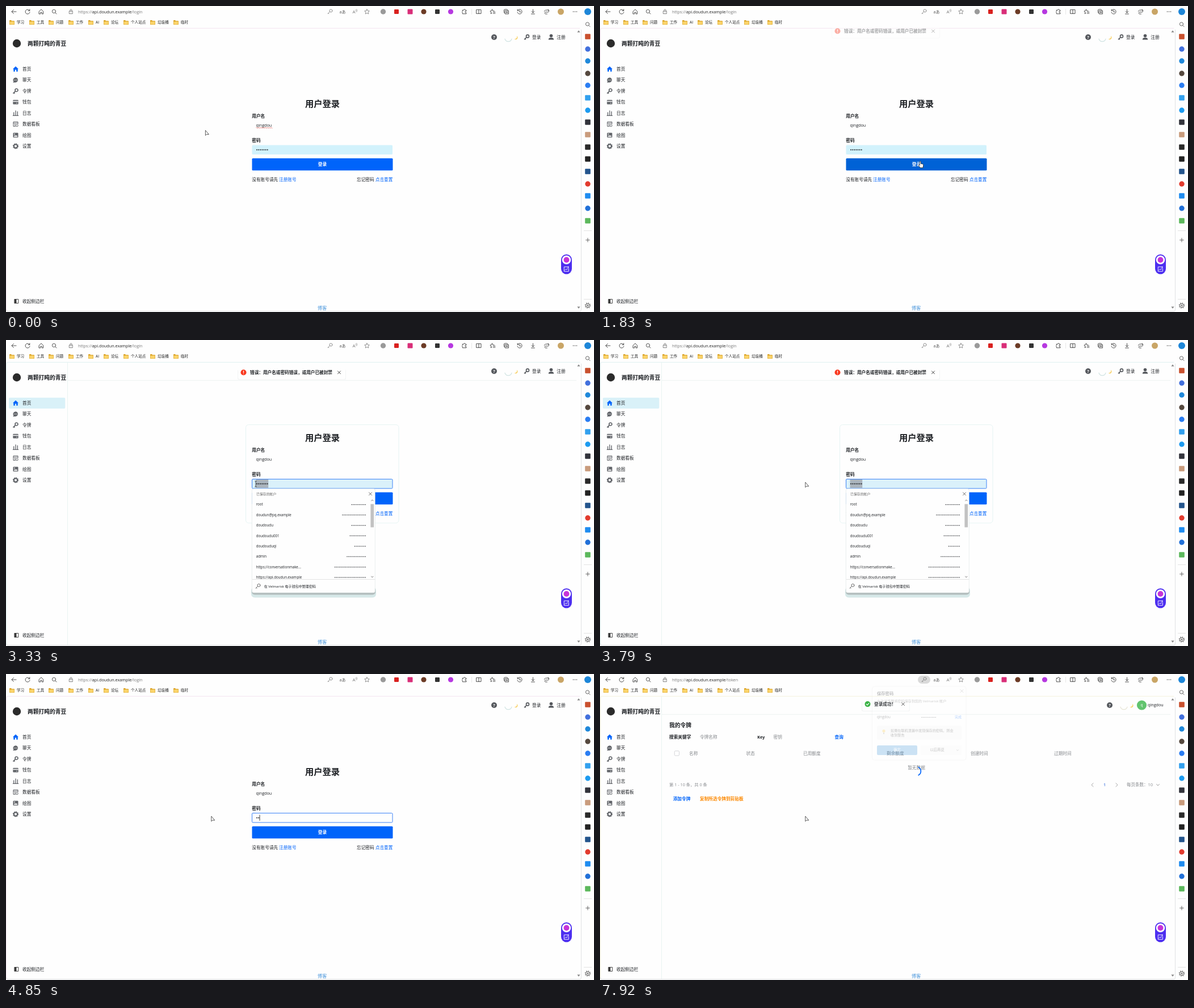
An HTML page for the animation above (8 s loop, 1036 by 540 pixels).

```html
<!DOCTYPE html>
<html lang="zh-CN">
<head>
<meta charset="utf-8">
<title>用户登录</title>
<style>
html, body { margin: 0; width: 100%; height: 100%; overflow: hidden; background: #fefefe; }
svg { display: block; width: 1036px; height: 540px; }
text { font-family: 'Open Sans', 'Noto Sans CJK SC', 'Noto Sans CJK', sans-serif; white-space: pre; }
</style>
</head>
<body>
<svg id="stage" viewBox="0 0 1036 540" xmlns="http://www.w3.org/2000/svg"></svg>
<script>
const LOOP = 8000;
const INK = '#1c1f23', GREY = '#85888c', BLUE = '#0064fa', ICON = '#62656a', BAR = '#3c3c3c';

// Drawing helpers; text is placed by its middle height.
const text = (x, y, s, size = 7.67, fill = INK, weight = 400, anchor = 'start') =>
  `<text x="${x}" y="${(y + size * .37).toFixed(2)}" font-size="${size}" fill="${fill}" font-weight="${weight}" text-anchor="${anchor}">${s}</text>`;
const rect = (x, y, w, h, fill, r = 0, more = '') =>
  `<rect x="${x}" y="${y}" width="${w}" height="${h}" rx="${r}" fill="${fill}" ${more}/>`;
const disc = (x, y, r, fill, more = '') => `<circle cx="${x}" cy="${y}" r="${r}" fill="${fill}" ${more}/>`;
const box = (x, y, size, fill) => rect(x - size / 2, y - size / 2, size, size, fill, 1.2);
const line = (d, x, y, color = BAR, width = .9) =>
  `<path d="${d}" transform="translate(${x} ${y})" fill="none" stroke="${color}" stroke-width="${width}" stroke-linecap="round" stroke-linejoin="round"/>`;
const solid = (d, x, y, fill = ICON) => `<path d="${d}" transform="translate(${x} ${y})" fill="${fill}"/>`;
const dots = (x, y, n, pitch, size, id = '') =>
  `<path ${id && `id="${id}"`} d="M${x} ${y}h${(n - 1) * pitch + .1}" fill="none" stroke="${INK}" stroke-width="${size}" stroke-linecap="round" stroke-dasharray="0 ${pitch}"/>`;
const group = (id, body, more = '') => `<g id="${id}" ${more}>${body}</g>`;

const CROSS = 'M-2.5-2.5L2.5 2.5M2.5-2.5L-2.5 2.5';
const LENS = 'M1.9 1.9L4 4M2.6-.6A3.1 3.1 0 1 1-3.6-.6A3.1 3.1 0 1 1 2.6-.6';
const KEY = 'M4-1.6A2.5 2.5 0 1 1-1-1.6A2.5 2.5 0 1 1 4-1.6M-.4 0L-4 3.7M-3 2.7L-2 3.7';
const STAR = 'M0-4.3L1.3-1.5L4.3-1.2L2.1.9L2.7 4L0 2.5L-2.7 4L-2.1.9L-4.3-1.2L-1.3-1.5Z';
const gear = (x, y, c, w) => disc(x, y, 3.2, 'none', `stroke="${c}" stroke-width="${w}"`) +
  disc(x, y, 4.5, 'none', `stroke="${c}" stroke-width="1.2" stroke-dasharray="1.7 1.83"`);
const help = x => disc(x, 55, 5, '#55585d') + text(x, 55, '?', 7.5, '#fff', 700, 'middle');
const toggle = (x, shade) => line('M-6 2A6.2 6.2 0 0 0 6 2', x, 56, shade, 1.1) +
  solid('M1.7-3.3A3.6 3.6 0 1 1-3 2.1A4 4 0 0 0 1.7-3.3', x + 13.3, 56, '#f8d168');

function toolbar() {
  let s = line('M4 0H-4M-.6-3.4L-4 0L-.6 3.4', 14, 10) +
    line('M3.6-1.8A4 4 0 1 0 4 1M3.8-4.2V-1.6H1.2', 38, 10) +
    line('M-3.6-.6L0-4L3.6-.6V4H1.2V1.2H-1.2V4H-3.6Z', 62, 10) + line(LENS, 85, 10) +
    line('M-2.8-1H2.8V3.6H-2.8ZM-1.5-1V-2.6A1.5 1.5 0 0 1 1.5-2.6V-1M0 1V1.3', 114.5, 10, '#666', .8) +
    `<text x="127" y="12.8" font-size="7.25" fill="#777">https://<tspan fill="#222">api.doudun.example</tspan><tspan id="route">/login</tspan></text>` +
    rect(560, 3, 22, 14, '#dadada', 7, 'id="pill"') + line(KEY, 571, 10, '#777', .8) +
    text(593, 10, 'aあ', 7, '#555', 400, 'middle') + text(613, 10, 'A', 8, '#777', 400, 'middle') +
    line('M-1-1.5Q.3 0-1 1.5M.6-2.4Q2.4 0 .6 2.4', 617.3, 8, '#777', .6) + line(STAR, 636, 10, '#777', .8) +
    disc(664.5, 10, 4.7, '#9a9a9a') + box(688, 10, 8, '#d9211f') + box(712, 10, 9, '#d92e78') +
    disc(736, 10, 4.6, '#6c3b26') + box(760, 10, 8, '#333') + disc(783.5, 10, 4.6, '#b638e0') +
    line('M-3.2-2.7H-1A1.4 1.4 0 1 1 1.8-2.7H3.4V-.8A1.4 1.4 0 1 0 3.4 1.8V3.8H-3.2V1.8A1.6 1.6 0 0 1-3.2-.9Z', 807.5, 10) +
    rect(820, 5, .7, 10, '#ddd') +
    line('M-4-3.4H4V3.4H-4ZM0-3.4V3.4', 833, 10) +
    line('M-1-4L.2-1.4L2.8-1.2M-1-4L-2.2-1.4L-4.6-1L-2.8.9L-3.3 3.6L-1.2 2.4M1 .8H4.4M.8 3H4.4', 857.5, 10) +
    line('M-4-2.6Q-4-4-2.6-4H1Q2.4-4 2.4-2.6M-4-2.6V1Q-4 2.4-2.6 2.4M-1.8-1.8H4V4H-1.8ZM1.1-.4V2.6M-.4 1.1H2.6', 881.5, 10) +
    line('M-3.6-2A4.1 4.1 0 1 1-4 1M-3.8-4V-1.8H-1.6M0-2.2V.5H2', 905, 10) +
    line('M0-4V2M-2.4-.4L0 2L2.4-.4M-3 4H3', 928.5, 10) +
    line('M-1.5-2.8H2.2A1.8 1.8 0 0 1 2.2.8H-2.2A1.8 1.8 0 0 0-2.2 4H1M4.3-2.2L2.4-4M-4-.5L-2.5-2.5', 952.5, 10) +
    disc(977.5, 10, 5.5, '#c9a566') +
    [-3, 0, 3].map(d => disc(1002.5 + d, 10, .75, '#333')).join('') + disc(1025, 10, 6, '#1d86d8');
  [['学习', 6], ['工具', 41], ['问题', 75], ['工作', 110], ['AI', 145], ['论坛', 172], ['个人站点', 207], ['垃圾桶', 254], ['临时', 295]]
    .forEach(([name, x]) => {
      s += solid('M0-3.2Q0-4 .8-4H3L4.2-2.8H8.2Q9-2.8 9-2V3.2Q9 4 8.2 4H.8Q0 4 0 3.2Z', x, 29, '#dba52b') +
        rect(x + .6, 27.6, 7.8, 4.8, '#fbd56d', .6) + text(x + 13, 29, name, 6.6, '#222');
    });
  return s;
}

function rail() {
  const apps = [[54, '#c9502e', 1], [76, '#4270dd', 0], [97, '#1f88da', 0], [119, '#55483e', 0], [140, '#2a7df2', 0],
    [162, '#32a0ee', 1], [184, '#1d9bf0', 0], [205, '#33343c', 1], [227, '#c99b7c', 1], [249, '#2a2a2a', 1],
    [270, '#222', 1], [292, '#23548c', 1], [314, '#e23b2e', 0], [335, '#1f8cf0', 1], [357, '#2170d8', 0], [379, '#5cb85c', 1]];
  return line(LENS, 1025, 32.5, '#555') +
    apps.map(([y, c, sq]) => sq ? box(1025, y, 9.6, c) : disc(1025, y, 4.7, c)).join('') +
    rect(1018, 396, 14, .8, '#ddd') + line('M-3.3 0H3.3M0-3.3V3.3', 1025, 413, '#555') +
    rect(1018, 517, 14, .8, '#ddd') + gear(1025, 528.5, '#555', .9) + disc(1025, 528.5, 1.2, '#555');
}

function sidebar() {
  const names = ['首页', '聊天', '令牌', '钱包', '日志', '数据看板', '绘图', '设置'];
  const at = i => 111.2 + i * 19.45;
  const icons = [
    y => solid('M0-4.8L5 0H3.7V4.5H1.2V1.3H-1.2V4.5H-3.7V0H-5Z', 17, y, BLUE),
    y => solid('M0-4.5A4.8 4.4 0 1 1-1.5 4.2L-4.4 4.8L-3.7 2.6A4.7 4.5 0 0 1 0-4.5', 17, y) +
      [-2.2, 0, 2.2].map(d => disc(17 + d, y, .7, '#fff')).join(''),
    y => line(KEY, 17, y, ICON, 1.7),
    y => rect(12.3, y - 3.8, 9.4, 7.8, ICON, 1) + rect(12.3, y - 1.9, 9.4, 1.5, '#fff') + rect(18, y + 1.3, 2, .8, '#fff'),
    y => line('M-3.3 3.4V-1M0 3.4V-4M3.3 3.4V-2.5M-4.6 4.4H4.6', 17, y, ICON, 1.3),
    y => line('M4-.4V-4H-4V4H-.5M-4-1.8H4M-2 .4H0M-2 2.2H-1', 17, y, ICON, 1) + disc(19.3, y + 2.4, 1.9, 'none', `stroke="${ICON}"`),
    y => rect(12.5, y - 4.2, 9, 8.4, ICON, 1.2) + solid('M-3.4 2.9L-1.2-.2L.4 1.4L1.8.2L3.5 2.9Z', 17, y, '#fff') + disc(15, y - 2, .9, '#fff'),
    y => gear(17, y, ICON, 2.2)
  ];
  return disc(19, 66, 7.2, '#2b2b2b') + text(38, 66.3, '两颗打盹的青豆', 9.75, INK, 700) +
    names.map((n, i) => icons[i](at(i)) + text(29, at(i), n)).join('') +
    line('M-3.3-3.5H3.3V3.5H-3.3Z', 18.5, 521, '#333', .9) + rect(15.2, 517.5, 3.2, 7, '#333') + text(29, 521, '收起侧边栏');
}

function login() {
  return group('card', rect(422.5, 149.5, 269.5, 173.5, 'none', 5, 'stroke="#e4f3f2" stroke-width=".9"')) +
    text(557.5, 172, '用户登录', 15.3, INK, 700, 'middle') +
    text(433.3, 194, '用户名', 7.67, INK, 700) + text(440.5, 210.4, 'qingdou', 7.2) +
    `<path id="spell" d="M440.5 215${'q.8-1.6 1.6 0t1.6 0'.repeat(9)}" fill="none" stroke="#e0453c" stroke-width=".7"/>` +
    text(433.3, 237, '密码', 7.67, INK, 700) +
    rect(433.5, 245.5, 247.5, 16.5, '#d2f2fc', 1.5, 'id="field" stroke-width="1"') +
    rect(440.5, 246, 21.7, 15, '#aab4bd', 0, 'id="picked"') +
    dots(442.1, 253.7, 7, 3.1, 2, 'secret') + rect(0, 248.4, .8, 10.4, '#111', 0, 'id="caret"') +
    rect(433.5, 268.7, 248, 21.6, BLUE, 1.6, 'id="submit"') + text(557.5, 279.5, '登录', 7.67, '#fff', 700, 'middle') +
    text(433.3, 306.5, '没有账号请先') + text(481, 306.5, '注册账号', 7.67, BLUE) +
    text(618, 306.5, '忘记密码') + text(650.8, 306.5, '点击重置', 7.67, BLUE) +
    help(860) + toggle(885, '#cfe3e2') + line(KEY, 917.5, 55, '#55585d', 1.6) + text(927, 55, '登录') +
    disc(960.5, 52.5, 2.8, '#55585d') + solid('M-4.7 4.5Q-4.7.8 0 .8Q4.7.8 4.7 4.5Z', 960.5, 55, '#55585d') + text(970.3, 55, '注册');
}

function accounts() {
  const rows = [['root', 10], ['doudun@pq.example', 16], ['doudoudu', 10], ['doudoudu001', 11], ['doudouduqi', 8],
    ['admin', 13], ['https://conversationmake...', 21], ['https://api.doudun.example', 21]];
  return rect(432, 436, 220, 18.5, '#d6e8e8', 6) + rect(433, 436, 218, 13.5, '#b3bdbd', 5) +
    rect(433.3, 262.5, 217, 183.5, '#fefefe', 3, 'stroke="#d5dcdc" stroke-width=".5"') +
    text(441, 271.5, '已保存的帐户', 5.9, '#666') + line(CROSS, 642, 271.5, '#444', .8) +
    `<g clip-path="url(#list)">` + rows.map(([name, n], i) => {
      const y = 290.2 + i * 18.36;
      return text(440.7, y, name, 6.2) + dots(633.2 - (n - 1) * 2.68, y + .3, n, 2.68, 1.5);
    }).join('') + '</g>' +
    line('M-1.7.8L0-.9L1.7.8', 645.3, 283, '#666', .9) + line('M-1.7-.8L0 .9L1.7-.8', 645.3, 418, '#666', .9) +
    rect(642.4, 289.5, 5.7, 41, '#c2c2c2') + rect(433.8, 422, 216.5, .8, '#ddd') +
    line(KEY, 444, 434.5, '#444', .8) + text(454.7, 434.5, '在 Velmarisk 电子钱包中管理密码', 6.05);
}

const toast = (x, w, color, mark, message, gap) =>
  rect(x - 1, 52, w + 2, 18.2, '#f2f4f4', 3) + rect(x, 45.5, w, 23.8, '#fefefe', 3) +
  disc(x + 9.5, 57.3, 5, color) + line(mark, x + 9.5, 57.3, '#fff', 1.2) +
  text(x + 21, 57.3, message, 7.63, INK, 700) + line(CROSS, x + gap, 57.3, '#444', 1);

function tokens() {
  const heads = [[157, '名称'], [257.5, '状态'], [358, '已用额度'], [505, '剩余额度'], [653, '创建时间'], [800, '过期时间']];
  return text(122, 90.5, '我的令牌', 9.75, INK, 600) + text(122, 111, '搜索关键字', 7.67, INK, 700) +
    text(176, 111, '令牌名称', 7.67, GREY) + text(277.3, 111, 'Key', 7.2, INK, 700) + text(305.5, 111, '密钥', 7.67, GREY) +
    text(413.5, 111, '查询', 7.67, BLUE, 700) +
    rect(131.3, 135.8, 8.2, 8.2, '#fff', 1.5, 'stroke="#c9cbce" stroke-width=".8"') +
    heads.map(([x, s]) => text(x, 140, s, 7.67, GREY)).join('') +
    text(557.5, 165, '暂无数据', 7.67, GREY, 400, 'middle') +
    `<path id="spin" d="M561.2 164.5A8 8 0 0 1 561.2 178.5" fill="none" stroke="${BLUE}" stroke-width="1.7" stroke-linecap="round"/>` +
    text(122, 195.7, '第 1 - 10 条，共 0 条', 7.3, GREY) +
    line('M1.6-3L-1.6 0L1.6 3', 867.5, 195.7, '#999') + text(889, 195.7, '1', 7.2, '#4d7fe0', 600, 'middle') +
    line('M-1.6-3L1.6 0L-1.6 3', 910.5, 195.7, '#999') + text(928, 195.7, '每页条数：10', 7.5, GREY) +
    line('M-2.4-1.2L0 1.2L2.4-1.2', 983, 195.7, '#888') +
    text(128.7, 220.5, '添加令牌', 7.67, BLUE, 700) + text(176, 220.5, '复制所选令牌到剪贴板', 7.67, '#fc8800', 700) +
    help(898) + toggle(923, '#e6e4d4') + disc(954.5, 55, 8.6, '#62c46e') + text(954.5, 54.5, 'q', 6.5, '#fff', 400, 'middle') +
    text(965, 54.7, 'qingdou', 7.2);
}

function savePrompt() {
  return rect(479.5, 22, 165.5, 130, '#fff', 4, 'stroke="#ddd" stroke-width=".8" fill-opacity=".6"') +
    text(488, 34.5, '保存密码', 7.3, INK, 600) + line(CROSS, 637.5, 30, '#666', .7) +
    text(488, 48, '允许浏览器将密码保存到您的 Velmarisk 帐户', 6.1, '#555') +
    text(488, 76, 'qingdou', 6.2) + dots(567, 76.5, 10, 2.68, 1.5) + text(625, 76, '完成', 6.1, BLUE) +
    rect(488, 91, 149, 25, '#f4f4f4', 3) + disc(500, 100.5, 2.6, '#f7c948') + rect(499, 103.5, 2, 2.5, '#999') +
    text(512, 99.7, '如果在联机泄漏中发现保存的密码，则会', 6.15, '#333') + text(512, 108, '收到警告', 6.15, '#333') +
    rect(488, 126, 71, 17, '#4a9cdd', 2) + text(523.5, 134, '确定', 6.3, '#fff', 400, 'middle') +
    rect(565, 126, 72, 17, '#f7f7f7', 2) + text(594, 134, '以后再说', 6.3, '#333', 400, 'middle') +
    line('M-1.6-.8L0 .8L1.6-.8', 630, 134.5, '#666', .7);
}

const floating = rect(978, 438.3, 19, 35, '#4d2ff0', 9.5) + disc(987.5, 448, 7.8, '#fff') + disc(987.5, 448, 5, '#c634d8') +
  line('M1.5-4H-4V4H4V-1M-2.4 1.7L-.7-.2L.7 1L2.4-1M3.2-4.6V-2.2M2-3.4H4.4', 987.3, 464.3, '#fff', .9);

const cursor =
  `<path id="arrow" d="M0 0V9L2.1 7.1H6Z" fill="#fff" stroke="#333" stroke-width=".8" stroke-linejoin="round"/>` +
  `<path id="hand" d="M-1.6-5.5Q-.6-6.6.3-5.5V-1.8L3.8-1Q5-.6 4.8 .8L4 5.4H-.8L-3.8 1.4Q-3.6 .2-2.6 .5L-1.6 1.3Z" fill="#fff" stroke="#222" stroke-width=".8" stroke-linejoin="round"/>` +
  `<path id="beam" d="M-1.6-5H1.6M0-5V5M-1.6 5H1.6" fill="none" stroke="#222" stroke-width=".8"/>`;

document.getElementById('stage').innerHTML =
  '<defs><clipPath id="list"><path d="M434 280H640V422H434Z"/></clipPath></defs>' +
  rect(0, 0, 1036, 540, '#fefefe') + toolbar() + rail() +
  line('M.8 537V42Q.8 39.3 3.5 39.3H1011', 0, 0, 'currentColor', .9).replace('<path', '<path id="edge"') +
  line('M1013.5 42V536Q1013.5 538.6 1011 538.6H3Q.8 538.6.8 536', 0, 0, '#d9dbdc', .8) +
  solid('M-2.6 1.5H2.6L0-2Z', 1009, 45, '#888') + solid('M-2.6-1.5H2.6L0 2Z', 1009, 532, '#888') +
  group('frame', rect(108.2, 40, .8, 498, '#e4f1ee') + rect(109, 70.8, 896, .8, '#e8f1ef')) +
  rect(5, 101.7, 99.3, 19.3, '#d9f1f8', 2, 'id="active"') + sidebar() +
  text(557, 533, '博客', 8.2, '#4b97dc', 500, 'middle') +
  group('login', login()) + group('tokens', tokens()) +
  group('failed', toast(409, 189, '#f93920', 'M0-2.6V.4M0 2.5V2.6', '错误：用户名或密码错误，或用户已被封禁', 178)) +
  group('done', toast(462, 83, '#3bb346', 'M-2.2 0L-.6 1.7L2.3-1.5', '登录成功！', 72)) +
  group('accounts', accounts()) + group('save', savePrompt(), 'opacity=".28"') + floating + group('cursor', cursor);

// Each row: start time, then the values held until the next row.
const POINTER = [[0, 351.4, 219.4, 'arrow'], [80, 364, 223, 'arrow'], [240, 425, 241, 'arrow'], [400, 505, 265, 'arrow'],
  [540, 556, 277, 'hand'], [680, 565, 280, 'hand'], [2870, 555.4, 275, 'hand'], [3030, 512, 255, 'beam'],
  [3180, 466, 254, 'beam'], [3330, 440, 254, 'beam'], [3480, 402, 252, 'arrow'], [3640, 370, 251.5, 'arrow'],
  [3790, 361.8, 251, 'arrow']];
const TYPED = [[0, 7, 0], [4690, 1, 1], [4850, 2, 1], [5300, 3, 1], [5440, 4, 1], [6040, 4, 0], [6460, 4, 1],
  [6620, 5, 1], [6780, 7, 1], [6920, 8, 1], [7200, 10, 1]];
const BUTTON = [[0, BLUE], [540, '#0062d6'], [680, '#004fb3'], [850, '#0062d6'], [3030, BLUE]];
const EDGE = [[0, '#f3e2ef'], [3180, '#dceff0'], [4690, '#f3e2ef'], [6460, '#dceff0'], [7780, '#f4f2da']];
const FAILED = [[0, -20, 0], [1830, -13, .4], [1980, -4, .9], [2130, 0, 1], [4850, 0, 0]];
const DONE = [[0, -20, 0], [7780, -12, .5], [7920, -4.2, 1]];

const el = id => document.getElementById(id);
const at = (steps, t) => steps.findLast(s => t >= s[0]).slice(1);
const show = (id, on) => el(id).setAttribute('visibility', on ? 'inherit' : 'hidden');
const slide = (id, [dy, alpha]) => {
  el(id).setAttribute('transform', `translate(0 ${dy})`);
  el(id).setAttribute('opacity', alpha);
};

function draw(t) {
  const [x, y, kind] = at(POINTER, t);
  el('cursor').setAttribute('transform', `translate(${x} ${y})`);
  for (const k of ['arrow', 'hand', 'beam']) show(k, k === kind);

  const home = t >= 7780, open = t >= 3180 && t < 4690;
  const [count, caret] = at(TYPED, t);
  show('login', !home);
  show('tokens', home);
  show('spell', !home && t < 680);
  show('picked', t >= 3330 && t < 4690);
  show('caret', !home && caret);
  show('accounts', open);
  show('card', open);
  show('active', open);
  show('frame', open || home);
  show('pill', t >= 7920);
  show('save', t >= 7920);
  el('route').textContent = home ? '/token' : '/login';
  el('secret').setAttribute('d', `M442.1 253.7h${(count - 1) * 3.1 + .1}`);
  el('caret').setAttribute('x', 440.4 + count * 3.1);
  el('field').setAttribute('fill', t < 3180 ? '#d2f2fc' : open ? '#daf1fa' : '#fefefe');
  el('field').setAttribute('stroke', t < 3180 ? 'none' : '#3b82f6');
  el('submit').setAttribute('fill', at(BUTTON, t)[0]);
  el('edge').setAttribute('stroke', at(EDGE, t)[0]);
  el('spin').setAttribute('transform', `rotate(${t < 7920 ? -84 : 0} 557.5 171.5)`);
  slide('failed', at(FAILED, t));
  slide('done', at(DONE, t));
}

const start = performance.now();
function tick() {
  draw((performance.now() - start) % LOOP);
  requestAnimationFrame(tick);
}
tick();
</script>
</body>
</html>
```
